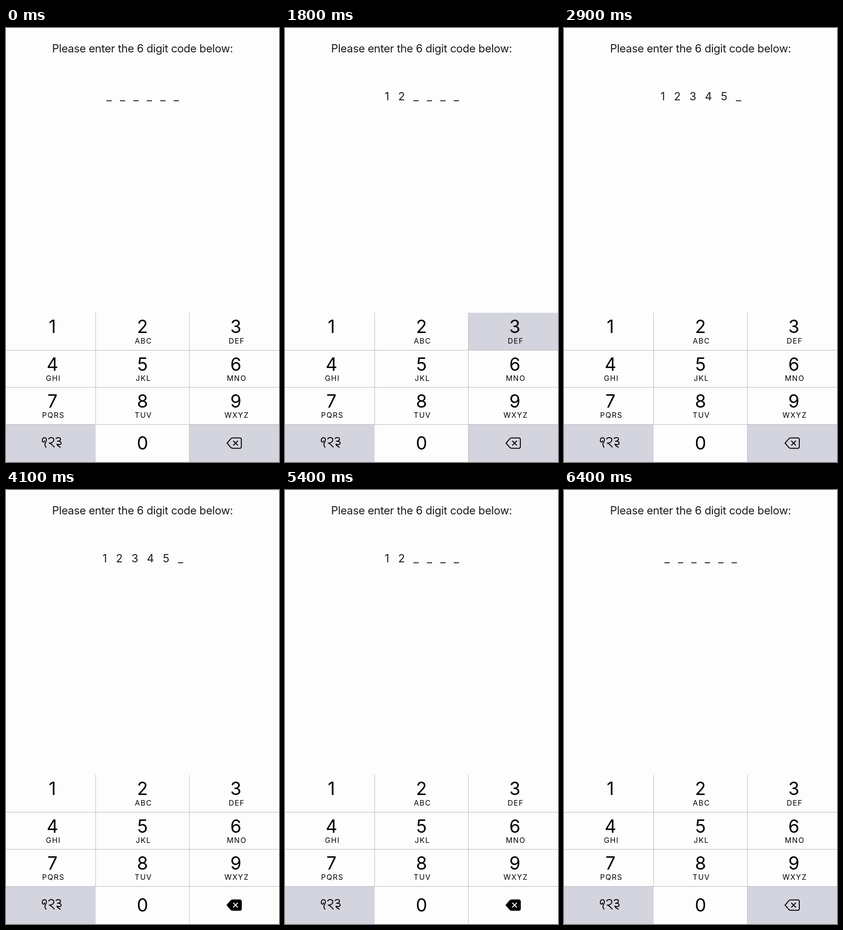
Recreate the animation shown at these times as an HTML page. Size 594 px wide and 942 px high, loop 7.2 s.

```html
<!DOCTYPE html>
<html lang="en">
<head>
<meta charset="utf-8">
<title>Code entry</title>
<style>
  html, body { margin: 0; width: 100%; height: 100%; overflow: hidden; background: #fefdfe; }
  svg { display: block; width: 594px; height: 942px; font-family: Inter, Roboto, sans-serif; text-anchor: middle; }
  .title { font-size: 24px; letter-spacing: -.36px; fill: #1b1b1f; }
  .code { font-size: 24px; fill: #1b1b1f; }
  .digit { font-size: 39px; }
  .letters { font-size: 16px; letter-spacing: 1.5px; }
  .line { fill: none; stroke: #b5b5b9; }
  .pen { fill: none; stroke: #000; stroke-width: 2; stroke-linecap: round; stroke-linejoin: round; }
</style>
</head>
<body>
<svg viewBox="0 0 594 942">
  <text class="title" x="297" y="53">Please enter the 6 digit code below:</text>
  <g id="code"></g>
  <g id="keys"></g>
  <path class="line" d="M195 618V861M399 618V942M0 699.5H594M0 780H594M0 860.5H594"/>
  <g id="labels"></g>
  <path class="pen" d="M84 896C84 900 79 900 79 895C79 887.5 88 887.5 88 893.5C88 901 81 901 87 910
    M93 892C95 887.5 104 888 104 894C104 899 98 901 94 901C98 901 101 906 105 909.5
    M109 891C112 888 118.500 888 118.500 892.500C118.500 896 114 897 112 897C117 896.500 120 898 120 901C120 905 113 905 111 903C111 907 115 907.500 118 910"/>
  <path class="pen" id="eraser" d="M481 901L489.500 891.200Q491 889.800 493 889.800H508.500Q512 889.800 512 893.300V908.700Q512 912.200 508.500 912.200H493Q491 912.200 489.500 910.800Z"/>
  <path class="pen" id="cross" d="M495 896.500L504 905.500M504 896.500L495 905.500"/>
</svg>
<script>
const LOOP = 7200, DELETE = 11;
const $ = id => document.getElementById(id);

// key, down, text change, start of release, up (ms)
const presses = [
  [1, 1000, 1100, 1100, 1100],
  [2, 1400, 1500, 1500, 1600],
  [3, 1800, 1900, 1900, 2000],
  [4, 2300, 2400, 2400, 2500],
  [5, 2700, 2800, 2800, 2900],
  [6, 3300, 3400, 3400, 3500],
  [DELETE, 4100, 4100, 4300, 4400],
  [DELETE, 4600, 4600, 4700, 4700],
  [DELETE, 5000, 5000, 5100, 5100],
  [DELETE, 5300, 5400, 5500, 5500],
  [DELETE, 5700, 5800, 6000, 6000],
  [DELETE, 6300, 6300, 6400, 6400]
];

const add = (parent, tag, attrs, text = '') => {
  const el = document.createElementNS('http://www.w3.org/2000/svg', tag);
  for (const name in attrs) el.setAttribute(name, attrs[name]);
  el.textContent = text;
  parent.append(el);
  return el;
};

const columns = [0, 195, 399, 594], rows = [618, 699.5, 780, 860.5, 942];
const centers = [101, 297, 500], baselines = [662, 744, 824, 915];
const letters = ['', 'ABC', 'DEF', 'GHI', 'JKL', 'MNO', 'PQRS', 'TUV', 'WXYZ'];
const keys = [];

for (let i = 0; i < 12; i++) {
  const col = i % 3, row = Math.floor(i / 3);
  keys.push(add($('keys'), 'rect', {
    x: columns[col], y: rows[row],
    width: columns[col + 1] - columns[col], height: rows[row + 1] - rows[row]
  }));
  if (i === 9 || i === DELETE) continue;
  const x = centers[col], y = baselines[row];
  add($('labels'), 'text', { class: 'digit', x, y }, i < 9 ? i + 1 : 0);
  if (letters[i]) add($('labels'), 'text', { class: 'letters', x: x + 2, y: y + (row ? 22 : 23) }, letters[i]);
}

function showCode(count) {
  $('code').replaceChildren();
  const cells = Array.from({ length: 6 }, (_, i) => i > 0 && i < count ? 33.9 : 29.25);
  let x = 297.4 - cells.reduce((a, b) => a + b) / 2;
  cells.forEach((width, i) => {
    const center = x + width / 2;
    if (i < count) add($('code'), 'text', { class: 'code', x: center, y: 157 }, i + 1);
    else add($('code'), 'rect', { x: center - 5.7, y: 157, width: 11.4, height: 1.9, fill: '#1b1b1f' });
    x += width;
  });
}

const shade = grey => `rgb(${254 - 43 * grey},${253 - 41 * grey},${254 - 32 * grey})`;

let shown = -1;
function draw(now) {
  const t = now % LOOP, held = Array(12).fill(0);
  let count = 0;
  for (const [key, down, change, release, up] of presses) {
    if (t >= change) count += key === DELETE ? -1 : 1;
    if (t >= down && t < up) held[key === DELETE ? key : key - 1] = t < release ? 1 : .5;
  }
  // The two side keys of the bottom row rest grey and turn white when held.
  keys.forEach((el, i) => el.setAttribute('fill', shade(i === 9 || i === DELETE ? 1 - held[i] : held[i])));
  const full = held[DELETE] === 1;
  $('eraser').style.fill = full ? '#000' : 'none';
  $('cross').style.stroke = full ? '#fff' : '#000';
  if (count !== shown) showCode(shown = count);
}

const start = performance.now();
function tick() {
  draw(performance.now() - start);
  requestAnimationFrame(tick);
}
tick();
</script>
</body>
</html>
```
